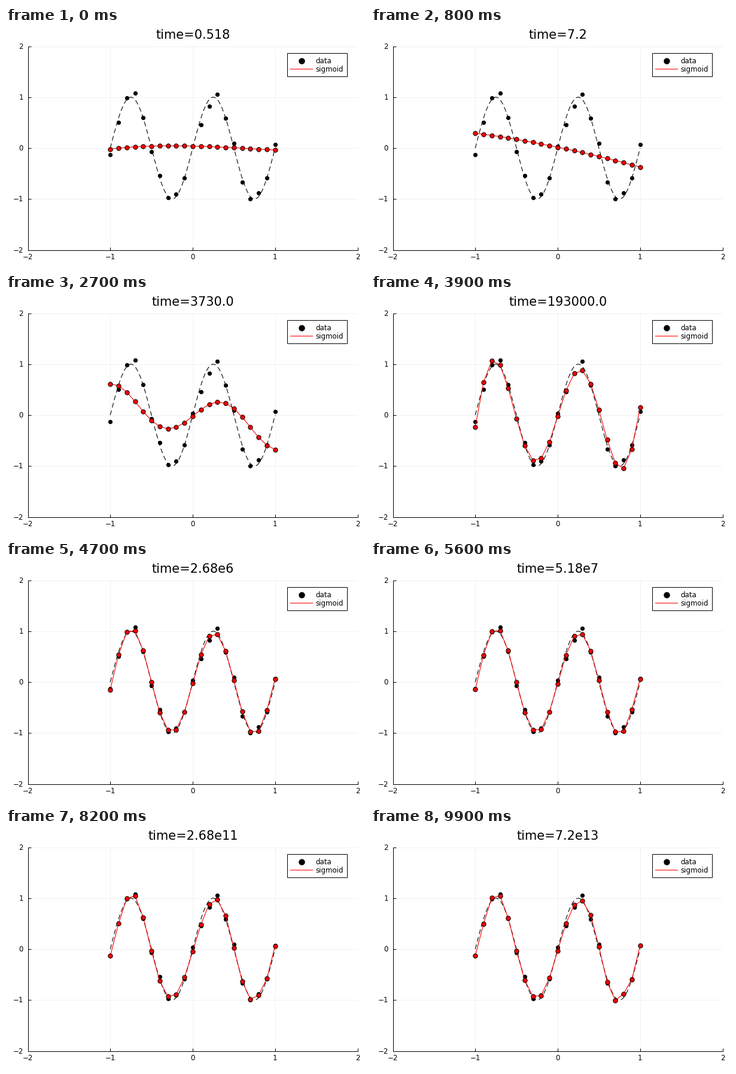
A matplotlib script that plays this animation: 600x400 px, repeating every 10 s.

```python
import numpy as np
import matplotlib.pyplot as plt
from matplotlib.animation import FuncAnimation
from matplotlib.lines import Line2D
from matplotlib.patches import Rectangle

W, H, DPI = 600, 400, 100
N = 100
PX = 72 / DPI  # points per pixel
plt.rcParams["font.family"] = "DejaVu Sans"

# Noisy samples of a sine wave
x = np.linspace(-1, 1, 21)
noise = [-.133, -.086, .032, .13, .01, -.074, .052, -.021, .043, .002, .038,
         -.135, -.126, .102, -.006, .094, -.075, -.05, .074, -.004, .067]
data = np.sin(2 * np.pi * x) + noise

# Training as gradient flow: orthogonal modes, each relaxing at its own rate.
# Every curved mode leans slightly on the one two degrees higher.
gram = np.linalg.qr(np.polynomial.legendre.legvander(x, 20))[0]
gram *= np.sign(gram[-1])
lean = gram.copy()
lean[:, 2:-2] -= .2 * gram[:, 4:]
modes = np.linalg.qr(lean)[0]
rates = 10 ** np.interp(np.arange(21), [0, 1, 3, 5, 7, 13, 20],
                        [.3, -.5, -2.57, -4.45, -5.6, -13.3, -23])


def time_at(i):
    return 10 ** ((i - 2) / 7)


start = modes.T @ (np.polyval([.03, -.068, -.04, .04], x) - data)


def fit(i):
    return data + modes @ (start * np.exp(-rates * (time_at(i) - time_at(0))))


def label(t):
    if t < 1e6:
        return f"time={float(f'{t:.3g}')}"
    mantissa, power = f"{t:.2e}".split("e")
    return f"time={float(mantissa)}e{int(power)}"


fig = plt.figure(figsize=(W / DPI, H / DPI), dpi=DPI, facecolor="white")


def text(px, py, s, size=11.75, ha="left"):
    return fig.text(px / W, 1 - py / H, s, fontsize=size * PX, ha=ha,
                    va="baseline", color="black")


L, R, T, B = 36.5, 587.5, 30.5, 371.5
ax = fig.add_axes([L / W, 1 - B / H, (R - L) / W, (B - T) / H])
ax.set(xlim=(-2, 2), ylim=(-2, 2), xticks=range(-2, 3), yticks=range(-2, 3))
ax.set_axisbelow(True)
ax.grid(color="black", alpha=.1, lw=.55 * PX)
ax.tick_params(direction="in", length=5 * PX, width=PX,
               labelbottom=False, labelleft=False)
ax.spines[["top", "right"]].set_visible(False)
ax.spines[["left", "bottom"]].set_linewidth(PX)

for v in range(-2, 3):
    s = str(v).replace("-", "\u2212")
    text(L + (v + 2) * (R - L) / 4, 387.2, s, ha="center")
    text(28.7, B - (v + 2) * (B - T) / 4 + 4.2, s, ha="right")

u = np.linspace(-1, 1, 401)
ax.plot(x, data, "o", color="black", ms=7.2 * PX, mew=0, zorder=3, snap=False)
ax.plot(u, np.sin(2 * np.pi * u), color="black", lw=1.1 * PX, zorder=3,
        dashes=(8 / 1.1, 5 / 1.1), dash_capstyle="butt")
curve, = ax.plot([], [], "-o", color="red", lw=1.1 * PX, ms=7.3 * PX,
                 mec="black", mew=PX, zorder=4, snap=False)

# Legend
over = fig.add_axes([0, 0, 1, 1])
over.set(xlim=(0, W), ylim=(H, 0))
over.axis("off")
over.add_patch(Rectangle((469.5, 41.5), 100, 39, fc="white", ec="black", lw=PX))
over.add_line(Line2D([494], [55.1], marker="o", color="black", ms=10.4 * PX,
                     mew=0, snap=False))
over.add_line(Line2D([475.5, 512.5], [68.8, 68.8], color="red", lw=1.1 * PX,
                     snap=False))
text(517.8, 59.2, "data")
text(517.8, 72.6, "sigmoid")

title = text((L + R) / 2 + .3, 18, "", 20.85, "center")


def draw(i):
    curve.set_data(x, fit(i))
    title.set_text(label(time_at(i)))
    return curve, title


anim = FuncAnimation(fig, draw, frames=N, interval=100, repeat=True, blit=False)
plt.show()
```
